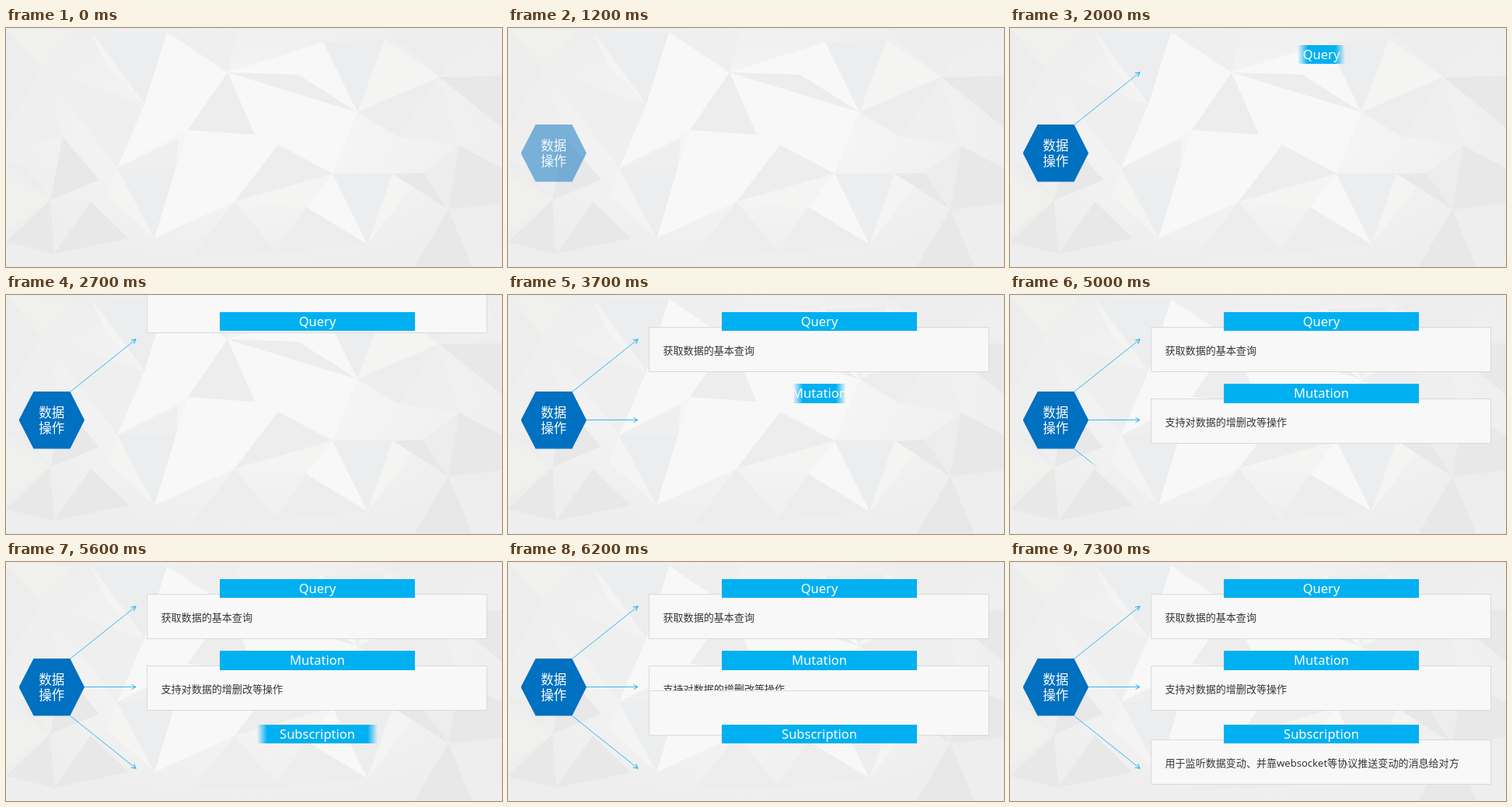
These frames come from a looping animation (638 by 307 pixels, 8600 ms). An HTML page:

```html
<!DOCTYPE html>
<html lang="zh-CN">
<head>
<meta charset="utf-8">
<title>数据操作</title>
<style>
/* One clock in ms, ticking every 100 ms; each part derives its progress --p from it. */
@property --t { syntax: "<number>"; inherits: true; initial-value: 0; }
@keyframes clock { to { --t: 8600; } }

:root { animation: clock 8600ms steps(86) infinite; }
html, body { margin: 0; width: 100%; height: 100%; overflow: hidden; }
body {
  position: relative;
  background: #f0f0f1;
  font-family: "Noto Sans", "Noto Sans CJK SC", "Noto Sans CJK", sans-serif;
}
body > * { position: absolute; }
.backdrop { left: 0; top: 0; width: 638px; height: 307px; }

.fade, .wipe, .split, .panel {
  --len: 500;
  --p: clamp(0, (var(--t) - var(--at)) / var(--len), 1);
}
.fade { opacity: var(--p); }
.wipe {
  --soft: 10px;
  --front: calc(var(--p) * (100% + var(--soft)));
  mask-image: linear-gradient(90deg, #000 calc(var(--front) - var(--soft)), transparent var(--front));
}
.split {
  --half: calc(var(--p) * 138.5px);
  --soft: min(13px, var(--half));
  mask-image: linear-gradient(90deg,
    transparent calc(50% - var(--half)),
    #000 calc(50% - var(--half) + var(--soft)),
    #000 calc(50% + var(--half) - var(--soft)),
    transparent calc(50% + var(--half)));
}

.hexagon {
  left: 16.5px; top: 124px; width: 84.5px; height: 73.5px;
  box-sizing: border-box; padding-top: 17px;
  background: #0070c0;
  clip-path: polygon(0 50%, 22.5% 0, 78% 0, 100% 50%, 78% 100%, 22.5% 100%);
  color: #fff; font-size: 16.5px; font-weight: 500; line-height: 20px; text-align: center;
}
.arrow { fill: none; stroke: #1eb4ee; stroke-width: .9; }
.panel {
  left: 181px; width: 438px; height: 58px;
  top: calc((-187 + var(--p) * (var(--y) + 187)) * 1px);
  box-sizing: border-box;
  background: #f8f8f8; border: 1px solid #dadada;
}
.note {
  left: 199.5px; top: calc(var(--y) * 1px + 20px);
  color: #363636; font-size: 13.05px; line-height: 20px; white-space: nowrap;
}
.bar {
  z-index: 1; left: 275px; width: 251px; height: 24.5px;
  background: #00b0f0;
  color: #fff; font-size: 16.5px; font-weight: 500; line-height: 24.5px; text-align: center;
}
</style>
</head>
<body>
<svg class="backdrop" viewBox="0 0 638 307">
  <defs>
    <radialGradient id="glow" cx="50%" cy="45%" r="55%">
      <stop offset=".3" stop-color="#f5f5f5"/>
      <stop offset="1" stop-color="#eeeeef"/>
    </radialGradient>
    <marker id="head" viewBox="-7 -4 8 8" markerWidth="8" markerHeight="8" markerUnits="userSpaceOnUse" refX="0" refY="0" orient="auto">
      <path d="M-5.5-3 0 0-5.5 3" fill="none" stroke="#1eb4ee"/>
    </marker>
  </defs>
  <path fill="url(#glow)" d="M0 0H638V307H0z"/>
  <!-- bright facets -->
  <path fill="#f8f8f8" d="M207 5 285 57 178 98zM285 57 408 18 376 60zM376 60 408 18 452 108zM285 57 452 108 320 137zM320 137 452 108 420 187zM178 98 285 57 234 131 143 180zM219 178 234 131 320 137zM219 178 320 137 294 223zM320 137 420 187 350 150 294 223zM219 178 294 223 191 270zM420 187 465 278 386 230z"/>
  <path fill="#f4f4f3" d="M487 15 557 63 452 108zM294 223 420 187 386 230zM143 180 191 270 130 215zM497 187 465 278 536 186zM109 5 178 98 130 50z"/>
  <!-- middle greys -->
  <path fill="#efefef" d="M207 5 300 0 285 57zM45 52 178 98 143 180zM45 52 73 140 0 150zM557 63 583 151 505 140zM143 180 222 142 219 178zM557 63 620 12 638 55z"/>
  <path fill="#ededee" d="M285 57 376 60 452 108zM285 57 234 131 320 137zM350 150 420 187 294 223zM452 108 557 63 505 140zM487 0 600 0 557 63zM294 223 350 290 240 292zM386 230 465 278 345 290zM0 0 45 52 0 130zM0 175 25 177 57 221zM536 186 583 151 569 233zM569 233 638 225 638 290z"/>
  <path fill="#ecedef" d="M112 5 207 5 178 98zM408 18 487 15 452 108zM143 180 219 178 191 270zM420 187 497 187 465 278z"/>
  <!-- dark facets near the edges -->
  <path fill="#e8e8e9" d="M73 140 120 195 57 221zM109 223 158 270 62 290zM57 221 62 290 0 275zM583 151 638 180 638 225 569 233zM497 187 536 186 569 233zM557 63 638 62 638 128zM569 233 600 307 525 307z"/>
  <path fill="#f0f0ec" d="M0 190 57 221 0 262zM0 0 88 4 45 52z"/>
</svg>

<div class="hexagon fade" style="--at:1000;--len:400">数据<br>操作</div>

<svg class="arrow wipe" style="--at:1400;left:80px;top:50px" width="90" height="78" viewBox="80 50 90 78">
  <path d="M83 124 167 57" marker-end="url(#head)"/>
</svg>
<svg class="arrow wipe" style="--at:3083;left:100px;top:154px" width="70" height="14" viewBox="100 154 70 14">
  <path d="M101 160.5H167" marker-end="url(#head)"/>
</svg>
<svg class="arrow wipe" style="--at:4840;left:80px;top:194px" width="90" height="76" viewBox="80 194 90 76">
  <path d="M83 198 167 265" marker-end="url(#head)"/>
</svg>

<div class="panel" style="--at:2310;--y:41"></div>
<div class="note wipe" style="--at:2810;--len:270;--y:41">获取数据的基本查询</div>
<div class="panel" style="--at:4008;--y:133"></div>
<div class="note wipe" style="--at:4510;--len:330;--y:133">支持对数据的增删改等操作</div>
<div class="panel" style="--at:5776;--y:228"></div>
<div class="note wipe" style="--at:6330;--len:960;--soft:24px;--y:228">用于监听数据变动、并靠websocket等协议推送变动的消息给对方</div>

<div class="bar split" style="--at:1890;top:21.5px">Query</div>
<div class="bar split" style="--at:3577;top:114px">Mutation</div>
<div class="bar split" style="--at:5320;top:208.5px">Subscription</div>
</body>
</html>
```
